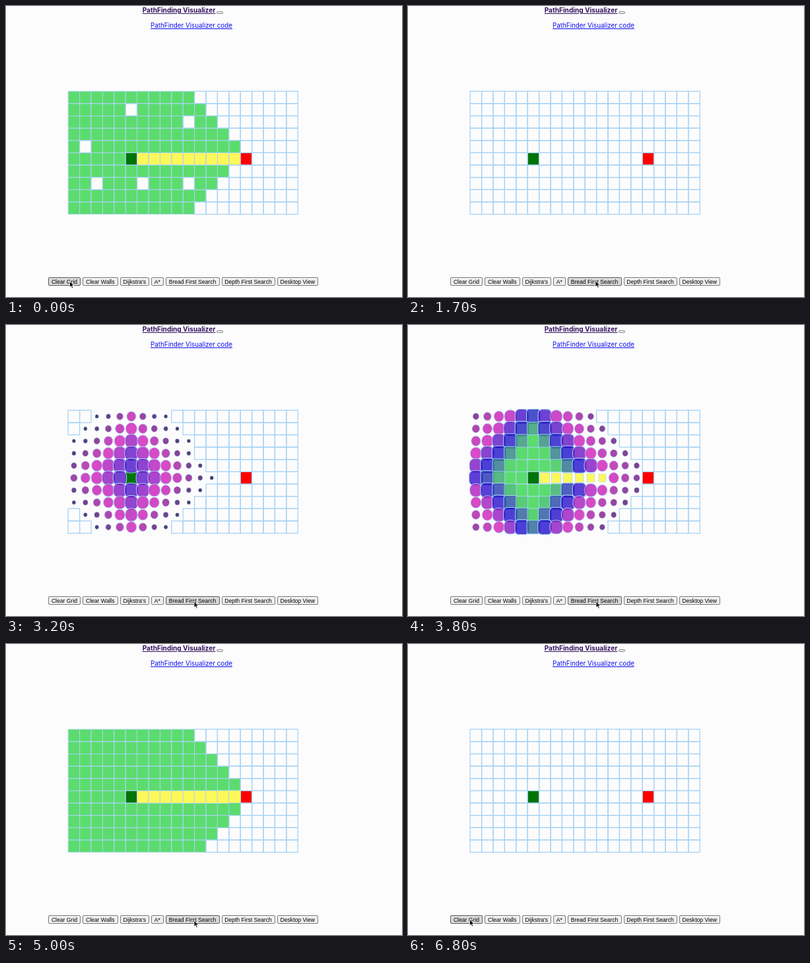
These frames come from a looping animation (600x441 px, 6.9 s). An HTML page with a canvas:

```html
<!DOCTYPE html>
<html lang="en">
<head>
<meta charset="utf-8">
<title>PathFinding Visualizer</title>
<style>
html, body { margin: 0; width: 100%; height: 100%; overflow: hidden; background: #fcfcfd; }
#stage { position: relative; width: 600px; height: 441px; overflow: hidden; }
#stage > * { position: absolute; }
canvas { left: 0; top: 0; }
.line {
  transform: translateX(-50%); white-space: nowrap; line-height: 14px;
  font-family: Inter, "Open Sans", sans-serif; text-decoration: underline;
}
#title { left: 262px; top: -1px; font-size: 10.1px; font-weight: 700; color: #35145f; }
#code { left: 281px; top: 23px; font-size: 9.8px; color: #1010ee; }
.btn {
  box-sizing: border-box; top: 410.5px; height: 13.5px; line-height: 12px;
  border: 1px solid #7b7b7b; border-radius: 2px; background: #efefef; color: #000;
  font: 8.6px/12px "Liberation Sans", Arial, sans-serif; text-align: center; white-space: nowrap;
}
.btn.hover { background: #d9d9d9; border-color: #5c5c5c; }
#tiny {
  box-sizing: border-box; left: 319px; top: 8px; width: 10px; height: 4px;
  border: 1px solid #8a8a8a; border-radius: 2px; background: #efefef;
}
#cursor { left: 0; top: 0; overflow: visible; }
</style>
</head>
<body>
<div id="stage">
  <canvas id="grid" width="600" height="441"></canvas>
  <div id="title" class="line">PathFinding Visualizer</div>
  <div id="tiny"></div>
  <div id="code" class="line">PathFinder Visualizer code</div>
  <svg id="cursor" width="9" height="13">
    <path d="M0 0V9.2L2.1 7.3L3.6 10.7L5.2 10L3.7 6.7H6.6Z" fill="#000" stroke="#fff" stroke-width=".8"/>
  </svg>
</div>
<script>
const LOOP = 6900, STEP = 100;
const COLS = 20, ROWS = 10, X0 = 94.2, Y0 = 129.2, W = 17.4, H = 18.64;
const START = { c: 5, r: 5 }, END = { c: 15, r: 5 };

const CLEAR_1 = 400, SEARCH = 2185, CLEAR_2 = 6400;
const VISIT_GAP = 10, PATH_GAP = 50, GROW = 1500;

const LINE = 'rgb(168,211,244)';
const NAVY = [0, 0, 66], PINK = [205, 15, 180], BLUE = [16, 0, 200], GREEN = [38, 210, 60];
const YELLOW = '#fdf85a';

const stage = document.getElementById('stage');
const cursor = document.getElementById('cursor');
const ctx = document.getElementById('grid').getContext('2d');

const buttons = [
  ['Clear Grid', 64, 113], ['Clear Walls', 116, 169.5], ['Dijkstra\'s', 172.5, 217],
  ['A*', 219.5, 239], ['Bread First Search', 241.5, 323.5],
  ['Depth First Search', 326.5, 407.5], ['Desktop View', 410.5, 473]
].map(([label, left, right]) => {
  const el = document.createElement('div');
  el.className = 'btn';
  el.textContent = label;
  el.style.left = left + 'px';
  el.style.width = right - left + 'px';
  stage.insertBefore(el, cursor);
  return { el, left, right };
});

// time, x, y of the pointer tip
const moves = [
  [0, 96.5, 417], [950, 96.5, 417], [1600, 284, 416.5], [1700, 284, 416.5],
  [2000, 285, 419], [5150, 285, 419], [5500, 210, 446], [5650, 140, 446],
  [6200, 94, 419], [6400, 93.5, 417.5], [LOOP, 93.5, 417.5]
];

const key = (c, r) => r * COLS + c;
const same = (a, b) => a.c === b.c && a.r === b.r;
const mix = (a, b, p) => a + (b - a) * p;
const smooth = p => p * p * (3 - 2 * p);
const easeOut = p => 1 - (1 - p) ** 1.7;

// breadth-first order: cell key -> position in the queue
function search() {
  const rank = new Map([[key(START.c, START.r), 0]]);
  const queue = [START];
  for (const { c, r } of queue) {
    for (const [dc, dr] of [[0, -1], [0, 1], [-1, 0], [1, 0]]) {
      const n = { c: c + dc, r: r + dr };
      if (n.c < 0 || n.r < 0 || n.c >= COLS || n.r >= ROWS || rank.has(key(n.c, n.r))) continue;
      if (same(n, END)) return rank;
      rank.set(key(n.c, n.r), queue.length);
      queue.push(n);
    }
  }
  return rank;
}
const rank = search();
const PATH = SEARCH + rank.size * VISIT_GAP;

const openCells = new Set(
  [[5, 1], [10, 2], [1, 4], [2, 7], [6, 7], [10, 7]].map(([c, r]) => key(c, r)));

const onPath = (c, r) => r === START.r && c > START.c && c < END.c;
const rgba = c => `rgba(${c.map(Math.round)},.75)`;
const blend = (a, b, p) => rgba(a.map((v, i) => mix(v, b[i], smooth(p))));

function visitLook(age) {
  const p = age / GROW;
  if (p >= 1) return { fill: rgba(GREEN) };
  const fill = p < .5 ? blend(NAVY, PINK, p / .5)
    : p < .75 ? blend(PINK, BLUE, (p - .5) / .25)
    : blend(BLUE, GREEN, (p - .75) / .25);
  const scale = p < .75 ? mix(.3, 1.2, smooth(p / .75)) : mix(1.2, 1, smooth((p - .75) / .25));
  return { fill, scale, round: Math.min(.5, 1 - p) };
}

function pathLook(age) {
  const p = age / GROW;
  if (p >= 1) return { fill: YELLOW };
  const scale = p < .5 ? mix(.6, 1.08, easeOut(p / .5)) : mix(1.08, 1, smooth(p * 2 - 1));
  return { fill: YELLOW, scale, round: 0 };
}

function look(c, r, t) {
  const cell = { c, r };
  if (same(cell, START)) return { fill: '#007305' };
  if (same(cell, END)) return { fill: '#ff0000' };
  if (t < CLEAR_1) {
    if (onPath(c, r)) return { fill: YELLOW };
    const reach = r < START.r ? 10 : 9;
    const dist = Math.abs(c - START.c) + Math.abs(r - START.r);
    return dist <= reach && !openCells.has(key(c, r)) ? { fill: rgba(GREEN) } : {};
  }
  if (t < SEARCH || t >= CLEAR_2) return {};
  const pathAge = t - PATH - (c - START.c - 1) * PATH_GAP;
  if (onPath(c, r) && pathAge >= 0) return pathLook(pathAge);
  const k = key(c, r);
  const age = t - SEARCH - rank.get(k) * VISIT_GAP;
  return age >= 0 ? visitLook(age) : {};
}

function drawGrid(t) {
  const still = [], moving = [];
  for (let r = 0; r < ROWS; r++) {
    for (let c = 0; c < COLS; c++) {
      const cell = { x: X0 + c * W, y: Y0 + r * H, ...look(c, r, t) };
      (cell.scale ? moving : still).push(cell);
    }
  }
  ctx.clearRect(0, 0, 600, 441);
  ctx.strokeStyle = LINE;
  for (const { x, y, fill } of still) {
    if (!fill) continue;
    ctx.fillStyle = fill;
    ctx.fillRect(x, y, W, H);
  }
  for (const { x, y, fill } of still) {
    ctx.lineWidth = fill ? .9 : 1.3;
    ctx.strokeRect(x, y, W, H);
  }
  for (const { x, y, fill, scale, round } of moving) {
    ctx.save();
    ctx.translate(x + W / 2, y + H / 2);
    ctx.scale(scale, scale);
    ctx.beginPath();
    ctx.roundRect(-W / 2, -H / 2, W, H, [{ x: W * round, y: H * round }]);
    ctx.fillStyle = fill;
    ctx.fill();
    ctx.lineWidth = .9;
    ctx.stroke();
    ctx.restore();
  }
}

function pointer(t) {
  const i = moves.findIndex(m => m[0] > t);
  const [t0, x0, y0] = moves[i - 1], [t1, x1, y1] = moves[i];
  const p = smooth((t - t0) / (t1 - t0));
  return [mix(x0, x1, p), mix(y0, y1, p)];
}

function draw(t) {
  drawGrid(t);
  const [x, y] = pointer(t);
  cursor.style.transform = `translate(${x}px, ${y}px)`;
  for (const { el, left, right } of buttons) {
    el.classList.toggle('hover', x >= left && x <= right && y > 410 && y < 424);
  }
}

const begin = performance.now();
function tick() {
  const t = (performance.now() - begin) % LOOP;
  draw(Math.floor(t / STEP) * STEP);
  requestAnimationFrame(tick);
}
tick();
</script>
</body>
</html>
```
